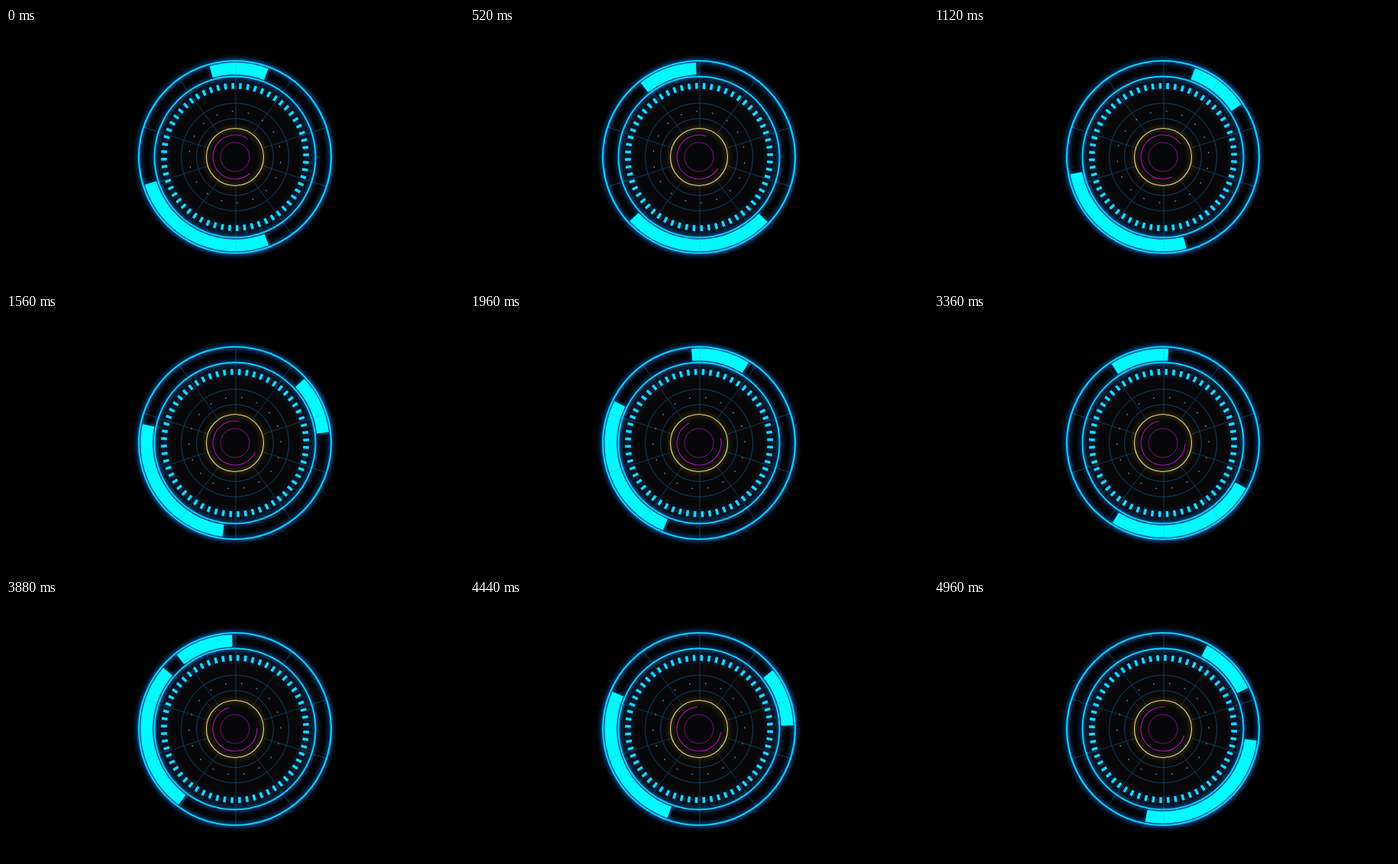
An HTML page for the animation above (5 s loop, 600 by 338 pixels).

```html
<!DOCTYPE html>
<html lang="en">
<head>
<meta charset="utf-8">
<title>Radar dial</title>
<style>
html, body { margin: 0; width: 100%; height: 100%; overflow: hidden; background: #000; }
svg { display: block; width: 100vw; height: 100vh; }
</style>
</head>
<body>
<svg viewBox="0 0 600 338" fill="none">
  <defs>
    <filter id="soft" filterUnits="userSpaceOnUse" x="-150" y="-150" width="300" height="300">
      <feGaussianBlur stdDeviation="3"/>
    </filter>
  </defs>
  <g id="dial" transform="translate(300 169)"></g>
</svg>
<script>
const LOOP = 5000, STEP = 40;
const dial = document.getElementById('dial');

function add(tag, attrs, parent = dial) {
  const el = document.createElementNS('http://www.w3.org/2000/svg', tag);
  for (const k in attrs) el.setAttribute(k, attrs[k]);
  parent.appendChild(el);
  return el;
}

// Angles run clockwise from the top, in degrees.
function point(r, deg) {
  const a = deg * Math.PI / 180;
  return (r * Math.sin(a)).toFixed(2) + ' ' + (-r * Math.cos(a)).toFixed(2);
}

function arc(r, span) {
  const h = span / 2;
  return `M${point(r, -h)}A${r} ${r} 0 ${span > 180 ? 1 : 0} 1 ${point(r, h)}`;
}

function marks(count, r0, r1) {
  let d = '';
  for (let i = 0; i < count; i++) {
    const a = i * 360 / count;
    d += `M${point(r0, a)}L${point(r1, a)}`;
  }
  return d;
}

function ring(r, stroke, width, extra) {
  return add('circle', { r, stroke, 'stroke-width': width, ...extra });
}

function glow(r, color, width, opacity) {
  ring(r, color, width, { opacity, filter: 'url(#soft)' });
}

// A crisp path over a blurred copy of itself.
function glowPath(d, color, width, halo, haloWidth, opacity) {
  const g = add('g', {});
  add('path', { d, stroke: halo, 'stroke-width': haloWidth, opacity, filter: 'url(#soft)' }, g);
  add('path', { d, stroke: color, 'stroke-width': width }, g);
  return g;
}

function band(span) {
  return glowPath(arc(115.8, span), '#00fbff', 15.6, '#0090ff', 18, 0.7);
}

function spokes(r0, r1, color, opacity) {
  add('path', { d: marks(10, r0, r1), stroke: color, opacity, transform: 'translate(1 0)' });
}

add('circle', { r: 105, fill: '#070709' });
spokes(38, 126, '#0b3854', 1);
ring(70.5, '#0c4264', 1);
ring(50.5, '#0c4264', 1);

const dots = add('path', { d: marks(18, 59.4, 60.6), stroke: '#3c8fae', 'stroke-width': 2.2 });
const ticks = glowPath(marks(60, 89.4, 97), '#1cd8ff', 3.5, '#0078e0', 6, 0.4);

glow(126, '#0080f0', 6, 0.6);
glow(105.5, '#0080f0', 6, 0.5);
const shortBand = band(36.3);
const longBand = band(93.8);
spokes(109, 123, '#0068a0', 0.2);
ring(126, '#0cd0ff', 2.2);
ring(105.5, '#0cd0ff', 2);

add('circle', { r: 37.5, fill: '#070709' });
glow(37.5, '#a08020', 5, 0.3);
ring(37.5, '#e6df8c', 1.1);
const hook = add('path', { d: arc(29, 257), stroke: '#b410b4', 'stroke-width': 1.1 });
ring(19, '#80107f', 1);

// Swings smoothly from one [seconds, degrees] turn to the next.
function swing(...turns) {
  return s => {
    const next = turns.findIndex(([time]) => time > s);
    if (next === 0) return turns[0][1];
    if (next < 0) return turns[turns.length - 1][1];
    const [t0, a] = turns[next - 1], [t1, b] = turns[next];
    const u = (s - t0) / (t1 - t0);
    return a + (b - a) * u * u * (3 - 2 * u);
  };
}

const parts = [
  [shortBand, swing([0, 2.5], [0.52, -20], [1.5, 67], [2.1, 5], [3.88, -20], [4.5, 72], [4.96, 46])],
  [longBand, swing([0, 206], [0.2, 152], [0.82, 206], [2.05, 250], [2.8, 211], [3.1, 139],
    [4, 270], [4.4, 248], [4.96, 144])],
  [hook, swing([0, 267], [0.52, 250], [1.12, 285], [1.96, 206], [2.8, 227], [3.88, 216], [4.96, 236])],
  [dots, swing([0.4, -3], [1.6, 8.5])],
  [ticks, s => -1.7 - 0.5 * s]
];

function draw(ms) {
  const s = Math.floor((ms % LOOP) / STEP) * STEP / 1000;
  for (const [el, angle] of parts) {
    el.setAttribute('transform', `rotate(${angle(s).toFixed(2)})`);
  }
}

let start;
function tick(now) {
  if (start === undefined) start = now;
  draw(now - start);
  requestAnimationFrame(tick);
}
draw(0);
requestAnimationFrame(tick);
</script>
</body>
</html>
```
